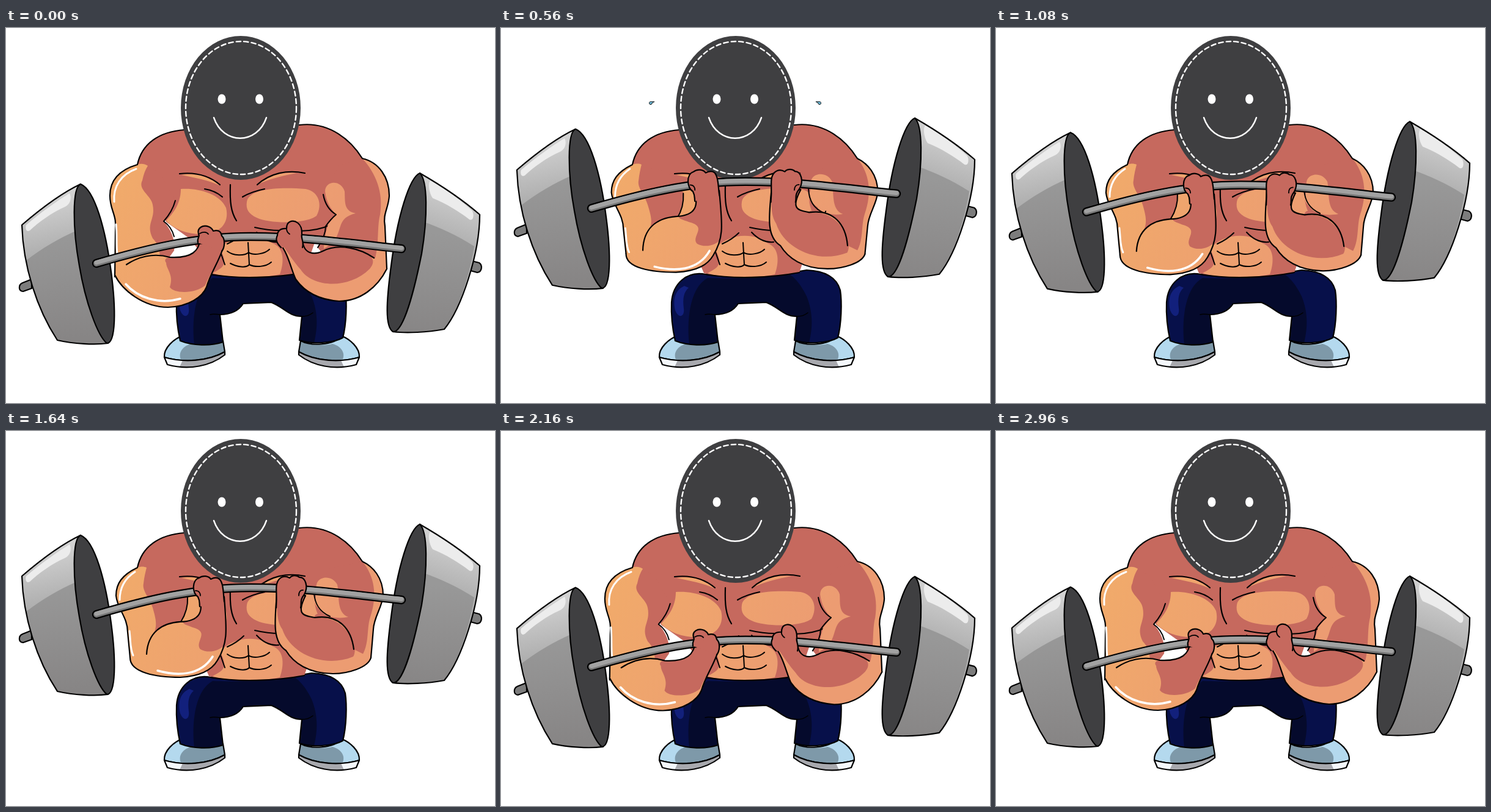
An HTML page with a canvas that plays this animation: 800x615 px, repeating every 3840 ms.

```html
<!DOCTYPE html>
<html lang="en">
<head>
<meta charset="utf-8">
<title>Barbell curl</title>
<style>
html, body { margin: 0; width: 100%; height: 100%; overflow: hidden; background: #fff; }
canvas { display: block; width: 800px; height: 615px; }
</style>
</head>
<body>
<canvas id="stage" width="800" height="615"></canvas>
<script>
const ctx = document.getElementById('stage').getContext('2d');
const LOOP = 3840, STEP = 40, LIFT = 85;
const RED = '#c6695e', DARK = '#3f3f41', INK = '#000';

function linear(x0, y0, x1, y1, ...colors) {
  const g = ctx.createLinearGradient(x0, y0, x1, y1);
  colors.forEach((c, i) => g.addColorStop(i / (colors.length - 1), c));
  return g;
}
const SKIN = linear(170, 230, 480, 400, '#f1ab6a', '#ec9c72');

const fill = (d, color) => { ctx.fillStyle = color; ctx.fill(new Path2D(d)); };
function line(d, width = 2.2, color = INK) {
  ctx.lineWidth = width;
  ctx.strokeStyle = color;
  ctx.stroke(new Path2D(d));
}
const shape = (d, color, width) => { fill(d, color); line(d, width); };

// Blend two paths of equal structure.
function mix(low, high, p) {
  const ends = high.match(/-?[\d.]+/g);
  let i = 0;
  return low.replace(/-?[\d.]+/g, n => (+n + (ends[i++] - n) * p).toFixed(2));
}

function ellipse(x, y, rx, ry, color) {
  ctx.beginPath();
  ctx.ellipse(x, y, rx, ry, 0, 0, Math.PI * 2);
  if (color) { ctx.fillStyle = color; ctx.fill(); }
}

function shoe() {
  const upper = 'M259 540C258 524 275 510 288 505C302 522 340 521 355 513L358 531C330 547 290 549 259 540Z';
  fill(upper, '#b4d9ee');
  fill('M303 518C287 522 281 535 287 545C318 547 340 540 358 530L355 513C340 520 320 522 303 518Z', '#7e99a9');
  line(upper);
  fill('M259 540C290 549 330 547 358 531L358 536C335 554 300 562 264 552Z', '#f4f8fc');
  fill('M289 545C318 547 340 540 358 531L358 536C335 553 315 557 284 556Z', '#a8a9ae');
  line('M259 540C290 549 330 547 358 531L358 536C335 554 300 562 264 552Z');
}

function legs() {
  shoe();
  ctx.save();
  ctx.translate(837, 0);
  ctx.scale(-1, 1);
  shoe();
  ctx.restore();
  const pants = 'M335 404C303 398 281 420 279 450C278 472 281 495 285 513C305 521 335 522 355 515L350 470C370 470 381 463 388 452L434 450C455 458 462 473 484 473L480 512C500 519 535 517 551 508C557 485 558 450 555 430C548 405 525 398 500 397C450 406 390 412 335 404Z';
  fill(pants, '#07104a');
  fill('M338 410C312 424 303 470 308 519C325 521 343 519 355 515L350 470C370 470 381 463 388 452L434 450C455 458 462 473 484 473L480 512C488 516 497 517 504 517C509 495 512 470 500 440C490 420 480 408 470 403C420 411 370 411 338 410Z', '#050a2c');
  fill('M300 423C284 430 281 446 285 463C291 478 301 473 299 460C297 443 299 433 307 426Z', '#12207c');
  line(pants);
  line('M334 470C340 468 345 470 350 470M484 473C492 473 497 471 502 467', 1.5);
}

function torso() {
  fill('M215 224C222 190 250 170 292 167L480 159C530 153 565 185 583 214L600 290L540 335L505 352L488 401C440 411 370 412 332 402L316 365L300 345L262 318Z', RED);
  line('M215 224C222 190 250 170 292 167M480 159C530 153 565 185 583 214');
  fill('M286 264C315 262 350 272 360 295C366 320 350 338 320 338C295 338 275 330 262 316C272 305 286 290 286 264Z', SKIN);
  fill('M394 285C398 262 450 261 490 264C512 268 518 290 508 308C490 322 430 321 410 311C397 305 392 297 394 285Z', SKIN);
  fill('M287 241C312 237 333 244 349 258C330 249 310 246 287 241ZM413 256C430 240 448 237 475 238C455 242 435 246 413 256Z', SKIN);
  fill('M350 362C372 336 415 335 436 353C456 360 455 385 448 404C420 410 370 412 338 402C352 394 366 390 350 362Z', SKIN);
  line('M284 239C310 236 332 242 350 257M325 264C338 266 347 271 354 277M489 238C460 232 432 238 411 257M423 264C408 267 397 271 387 277M367 257C366 285 368 302 377 316');
  line('M407 327C420 330 435 332 448 332M480 333C500 333 518 329 533 322M389 336C380 345 371 350 362 354M410 335C422 348 434 352 446 351', 2);
  line('M396 352L398 388M362 366C372 374 390 374 397 368C405 374 424 370 431 363M367 386C378 392 393 394 398 388C408 393 425 392 434 384M350 365L358 388', 2);
  line('M335 404C380 412 440 410 488 401');
  fill('M277 363L291 362L302 373L285 377L276 372Z', '#fff');
}

function head() {
  ellipse(384, 131, 98, 118, DARK);
  ellipse(384.5, 131, 90.5, 109);
  ctx.setLineDash([7.5, 5]);
  ctx.lineWidth = 2.4;
  ctx.strokeStyle = '#fff';
  ctx.stroke();
  ctx.setLineDash([]);
  ellipse(353, 116.5, 6.5, 8, '#fff');
  ellipse(414.5, 116.5, 6.5, 8, '#fff');
  line('M340 147C355 192 411 192 426 147', 2.4, '#fff');
}

function plates() {
  const lower = (x0, x1) => linear(x0, 340, x1, 510, '#989898', '#878585');
  shape('M42 412L27 418C20 421 20 432 28 432L42 427Z', '#7c7c7c');
  const left = 'M26 323C55 298 90 271 122 256L167 517C145 520 110 518 84 512C50 460 28 390 26 323Z';
  fill(left, linear(60, 280, 80, 370, '#d2d2d2', '#adadad'));
  fill('M33 381C58 362 88 344 114 333L167 517C145 520 110 518 84 512C58 472 40 425 33 381Z', lower(80, 100));
  fill('M33 323C55 304 84 283 104 271C108 279 105 289 97 293C74 303 53 319 39 332C33 336 31 328 33 323Z', '#ececec');
  line(left);
  shape('M122 256C108 261 109 330 120 390C130 450 150 505 165 517C180 517 180 460 172 400C163 330 145 265 122 256Z', DARK);

  shape('M762 382L774 385C780 389 779 400 771 401L760 398Z', '#7c7c7c');
  const right = 'M677 238C710 257 745 280 775 306C775 370 745 460 717 494C690 499 655 501 633 498Z';
  fill(right, linear(740, 260, 710, 350, '#d2d2d2', '#adadad'));
  fill('M680 317C708 326 738 340 766 358C757 412 738 468 717 494C690 499 655 501 633 498Z', lower(730, 710));
  fill('M694 250C720 265 745 283 763 300C766 307 765 317 758 314C740 300 720 288 698 279C692 270 690 255 694 250Z', '#ececec');
  line(right);
  shape('M677 238C660 245 640 310 630 390C622 450 620 490 633 498C650 500 668 430 680 370C690 310 690 250 677 238Z', DARK);
}

function bar() {
  const axis = 'M148 386C230 362 310 342 400 342C490 342 560 353 647 362';
  line(axis, 14.5);
  line(axis, 10, '#777');
  ctx.save();
  ctx.translate(0, -1.3);
  line(axis, 7, '#a2a2a2');
  ctx.restore();
}

function leftArm(p) {
  const m = (a, b) => mix(a, b, p);
  const edge = m('M215 224C188 232 170 248 170 275C170 300 182 305 179 335L178 408',
                 'M215 224C190 236 180 250 180 270C182 292 199 305 199 330L203 372');
  fill(edge + m('L250 400L275 365C278 350 270 330 258 317C266 308 273 298 277 283L250 235Z',
                'L250 395L290 350C290 335 288 325 286 313C293 300 298 290 298 272L270 235Z'), RED);
  fill(edge + m('L250 400C255 370 250 355 240 345C228 320 245 315 240 290C238 275 215 265 223 250C225 240 228 232 232 226C226 222 220 222 215 224Z',
                'L250 395C240 370 240 350 240 335C248 322 246 310 240 290C236 275 222 262 225 250C226 240 228 232 230 224C226 222 220 222 215 224Z'), SKIN);
  line(edge);
  line(m('M277 283C273 298 266 308 258 317C265 322 272 330 275 342',
         'M297 272C298 290 293 302 286 313C286 316 288 318 288 320'), 2);
  line(m('M213 231C188 240 175 260 177 285M180 322C182 340 180 355 182 370',
         'M211 231C194 242 186 257 186 277M202 328C204 345 203 358 208 368'), 3, '#fff');

  const forearm = m('M178 405C190 430 225 458 265 458C300 457 322 440 328 425C335 400 348 385 356 358L318 345C316 365 305 378 268 376C240 368 215 376 197 388',
                    'M203 372C203 396 245 404 285 404C322 402 338 390 346 376C365 345 360 320 357 272L314 268C325 295 318 312 285 313C255 315 232 330 230 366');
  fill(forearm, SKIN);
  fill(m('M268 376C305 378 316 365 318 345L356 358C348 385 335 400 326 422C310 436 275 436 268 425C275 405 262 395 262 385C258 380 262 376 268 376Z',
         'M290 313C318 312 325 295 314 268L357 272C360 320 365 330 360 348C350 362 330 365 318 358C308 345 335 330 305 322C295 318 288 316 290 313Z'), RED);
  line(forearm);
  line(m('M196 420C215 442 250 454 285 444', 'M248 393C280 402 318 402 338 370'), 3.5, '#fff');
}

function rightArm(p) {
  const m = (a, b) => mix(a, b, p);
  const edge = m('M583 214C610 220 627 245 627 275C626 295 616 305 620 325L623 395',
                 'M583 214C600 222 617 240 617 270C615 290 602 305 601 325L597 372');
  fill(edge + m('L540 400L510 360C520 340 525 320 540 306C530 300 522 290 519 273L545 225Z',
                'L540 390L500 350C500 330 500 300 510 300C506 290 505 285 504 265L530 225Z'), RED);
  fill(edge + m('L600 390C612 360 606 330 612 306C618 270 605 238 583 214Z',
                'L570 382C598 360 588 330 596 305C608 270 603 238 583 214Z'), SKIN);
  fill(m('M522 268C522 250 548 248 554 268C555 285 552 300 572 304C540 312 552 330 535 352L520 362C520 345 525 330 527 322L540 306C530 295 524 285 522 268Z',
         'M508 258C505 238 533 234 542 252C546 270 540 298 560 305C545 308 530 306 520 300L518 298C512 292 508 288 506 284L505 280C507 270 508 265 508 258Z'), SKIN);
  line(edge);
  line(m('M519 273C522 290 530 300 540 306C534 311 528 318 523 325C523 336 518 348 510 360',
         'M504 265C505 283 512 296 530 304C530 304 530 304 530 304C530 304 530 304 530 304'), 2);

  const forearm = m('M623 395C608 425 580 448 545 448C515 446 490 435 474 412C466 395 462 370 447 352L485 348C487 372 505 372 518 366C545 352 580 362 602 377',
                    'M597 372C592 388 560 398 535 398C495 398 470 380 458 360C435 345 440 310 443 268L490 270C475 300 485 303 505 306C545 300 565 325 569 358');
  fill(forearm, SKIN);
  fill(m('M450 352C462 370 472 385 482 396C500 425 560 430 595 395C608 380 595 372 585 367C555 352 535 360 518 366C505 372 487 372 485 348Z',
         'M444 268C442 300 445 315 452 325C465 365 520 390 568 370C572 365 572 350 566 340C550 312 530 305 505 306C485 303 475 300 490 270Z'), RED);
  line(forearm);
}

function hands(p) {
  shape(mix('M314 352C312 344 318 342 315 338C312 328 322 322 332 326C336 328 338 330 339 333C350 330 352 336 353 341C359 346 358 360 353 366',
            'M317 288C316 282 318 280 314 272C304 266 304 244 316 241C322 236 332 238 335 243C345 238 350 242 352 247C356 255 355 262 357 280', p), RED);
  line(mix('M317 337C322 334 328 334 331 338', 'M310 262C316 262 318 266 318 270', p), 1.8);
  shape(mix('M485 360C488 350 482 345 484 338C485 320 472 314 464 318C460 320 459 324 459 329C448 328 444 334 444 340C440 348 444 354 450 360',
            'M482 290C484 282 480 278 488 268C495 255 490 240 480 240C476 236 468 236 464 241C455 236 447 240 444 248C440 256 444 262 442 290', p), RED);
  line(mix('M459 329C459 333 461 336 464 338', 'M486 261C481 261 479 265 479 270', p), 1.8);
}

function sweat(t) {
  const start = [540, 1120].find(s => t >= s && t < s + 360);
  if (start === undefined) return;
  const u = (t - start) / 360;
  for (const side of [-1, 1]) {
    ctx.save();
    ctx.translate(383 + side * (135 + 28 * u), 126 - 56 * u);
    ctx.scale(side * (0.95 + 0.5 * u), 0.95 + 0.5 * u);
    ctx.rotate(-0.5 * u);
    shape('M-4 -2C-1 -2 4 -3 4 0C4 4 -1 3 -1 0C-2 -1 -3 -1 -4 -2Z', '#6db9d8', 1);
    ctx.restore();
  }
}

// Linear move, then a decaying swing past the end.
function travel(t, start) {
  const end = start + 180, s = (t - end) / 1000;
  if (t <= start) return 0;
  if (t < end) return (t - start) / 180;
  return 1 + 0.186 * Math.sin(6 * Math.PI * s) * Math.exp(-5.5 * s);
}

function draw(t) {
  const p = t >= 2960 ? 0 : travel(t, 360) - travel(t, 1820);
  const raised = paint => {
    ctx.save();
    ctx.translate(0, -LIFT * p);
    paint();
    ctx.restore();
  };
  ctx.fillStyle = '#fff';
  ctx.fillRect(0, 0, 800, 615);
  ctx.lineCap = ctx.lineJoin = 'round';
  legs();
  torso();
  head();
  raised(plates);
  leftArm(p);
  rightArm(p);
  raised(bar);
  hands(p);
  sweat(t);
}

const origin = performance.now();
function tick() {
  const t = Math.max(0, performance.now() - origin) % LOOP;
  draw(Math.floor(t / STEP) * STEP);
  requestAnimationFrame(tick);
}
tick();
</script>
</body>
</html>
```
